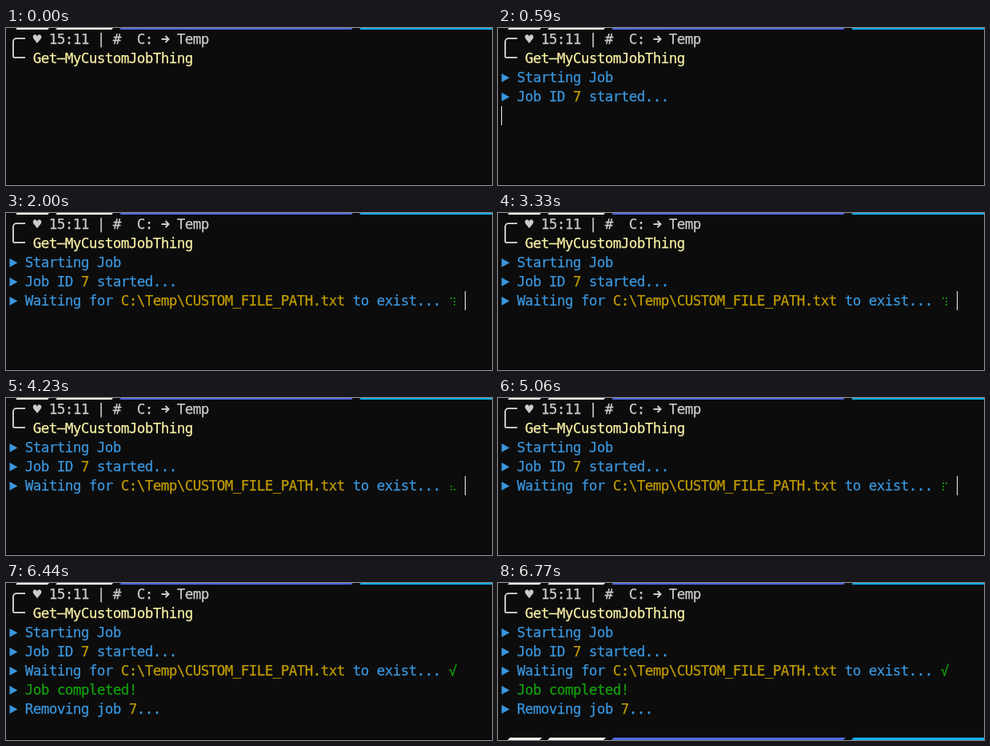
Write an HTML page with a canvas that moves like this. It is 608 by 197 pixels and loops after 8380 ms.

```html
<!DOCTYPE html>
<html lang="en">
<head>
<meta charset="utf-8">
<title>Terminal job</title>
<style>
html, body { margin: 0; width: 100%; height: 100%; overflow: hidden; background: #0c0c0c; }
canvas { display: block; }
</style>
</head>
<body>
<canvas id="stage" width="608" height="197"></canvas>
<script>
const ctx = document.getElementById('stage').getContext('2d');
const LOOP = 8380, TICK = 69.64, SPIN = 65.8;
const CELL = 10, ROW = 24, LEFT = 4, TOP = 2, SIZE = 17.5;
const C = {
  bg: '#0c0c0c', fg: '#cccccc', cmd: '#f9f1a5', blue: '#3a96dd',
  gold: '#c19c00', green: '#13a10e', dots: '#118a0d', white: '#f2f2f2'
};
// Segments of the prompt bar: left, right, colour
const BAR = [
  [14, 54, '#fffaf3'], [64, 134, '#fffaf3'],
  [144, 434, '#4f68e4'], [444, 612, '#10b0ee']
];
const BRAILLE = '⠋⠙⠹⠸⠼⠴⠦⠧⠇⠏';

const colX = col => LEFT + col * CELL;
const rowY = row => TOP + row * ROW;

// One glyph per terminal cell, with a hairline for weight
function text(str, col, row, color) {
  ctx.fillStyle = ctx.strokeStyle = color;
  ctx.lineWidth = 0.25;
  [...str].forEach((ch, i) => {
    const x = colX(col + i) + CELL / 2, y = rowY(row) + 18;
    ctx.fillText(ch, x, y);
    ctx.strokeText(ch, x, y);
  });
}

function line(row, ...parts) {
  const y = rowY(row) + 12.5;
  ctx.fillStyle = C.blue;
  ctx.beginPath();
  ctx.moveTo(4.5, y - 5.5);
  ctx.lineTo(14.5, y);
  ctx.lineTo(4.5, y + 5.5);
  ctx.fill();
  let col = 2;
  for (const [str, color] of parts) {
    text(str, col, row, color);
    col += str.length;
  }
}

function bar(y, h, dx) {
  for (const [l, r, color] of BAR) {
    ctx.fillStyle = color;
    ctx.beginPath();
    ctx.moveTo(l + dx, y);
    ctx.lineTo(r + dx, y);
    ctx.lineTo(r + dx - h, y + h);
    ctx.lineTo(l + dx - h, y + h);
    ctx.fill();
  }
}

function prompt() {
  ctx.strokeStyle = '#dddddd';
  ctx.lineWidth = 1.8;
  ctx.beginPath();
  ctx.moveTo(24, 13.2);
  ctx.arcTo(9, 13.2, 9, 26, 4);
  ctx.arcTo(9, 37.2, 24, 37.2, 1.5);
  ctx.lineTo(24, 37.2);
  ctx.stroke();

  text('♥', 3, 0, C.fg);
  text('15:11 | #  C:', 5, 0, C.fg);
  ctx.lineWidth = 2;
  ctx.beginPath();
  ctx.moveTo(194.5, 14);
  ctx.lineTo(203, 14);
  ctx.moveTo(199.5, 10);
  ctx.lineTo(203.5, 14);
  ctx.lineTo(199.5, 18);
  ctx.stroke();
  text('Temp', 21, 0, C.fg);
  text('Get–MyCustomJobThing', 3, 1, C.cmd);
}

function spinner(t) {
  const tick = 590 + Math.floor((t - 590) / TICK) * TICK;
  const i = Math.floor((tick - 1815) / SPIN) + 30;
  const bits = BRAILLE.charCodeAt(i % 10) - 0x2800;
  ctx.fillStyle = C.dots;
  for (let n = 0; n < 6; n++) {
    if (bits >> n & 1) ctx.fillRect(556 + Math.floor(n / 3) * 4, 106 + n % 3 * 4, 2, 2);
  }
}

function cursor(col, row) {
  ctx.fillStyle = C.white;
  ctx.fillRect(colX(col), rowY(row), 1, ROW);
}

function draw(t) {
  ctx.fillStyle = C.bg;
  ctx.fillRect(0, 0, 608, 197);
  ctx.fillStyle = '#000';
  ctx.fillRect(0, 196, 608, 1);
  ctx.font = SIZE + 'px "DejaVu Sans Mono", monospace';
  ctx.textAlign = 'center';
  ctx.textBaseline = 'alphabetic';
  bar(0, 2, 0);
  prompt();

  if (t >= 260) line(2, ['Starting Job', C.blue]);
  if (t >= 590) line(3, ['Job ID ', C.blue], ['7', C.gold], [' started...', C.blue]);
  if (t >= 659) {
    line(4, ['Waiting for ', C.blue], ['C:\\Temp\\CUSTOM_FILE_PATH.txt', C.gold],
      [' to exist... ', C.blue]);
    if (t < 6300) spinner(t);
    else text('√', 55, 4, C.green);
  }
  if (t >= 6370) line(5, ['Job completed!', C.green]);
  if (t >= 6440) line(6, ['Removing job ', C.blue], ['7', C.gold], ['...', C.blue]);
  if (t >= 6770) bar(194, 3, 1);

  if (t >= 130 && t < 260) cursor(0, 2);
  else if (t >= 260 && t < 590) cursor(0, 3);
  else if (t >= 590 && t < 659) cursor(0, 4);
  else if (t >= 659 && t < 4390 || t >= 4920 && t < 5450) cursor(57, 4);
}

const start = performance.now();
function frame() {
  draw((performance.now() - start) % LOOP);
  requestAnimationFrame(frame);
}
frame();
</script>
</body>
</html>
```
